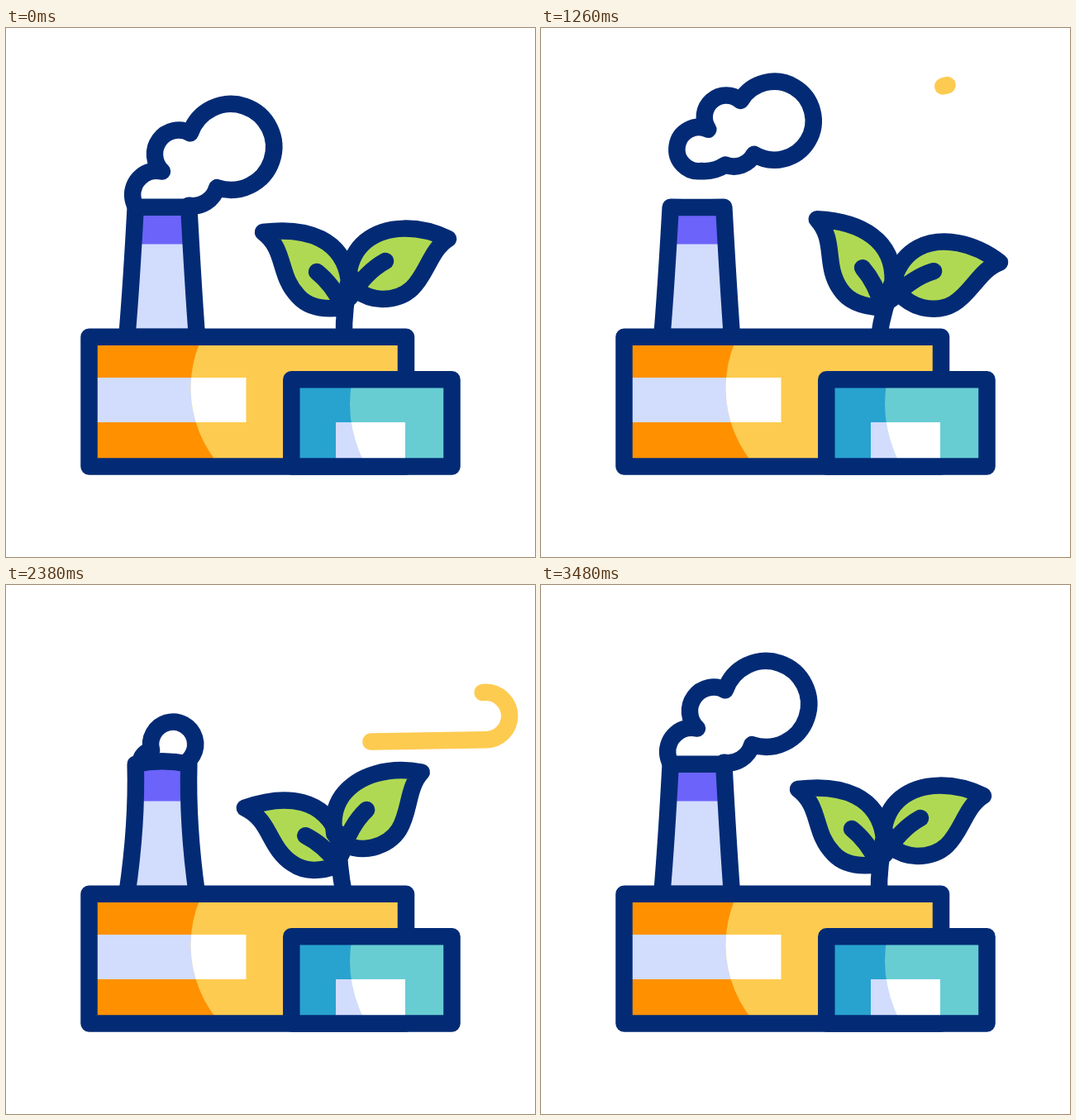
An HTML page with a canvas for the animation above (3600 ms loop, 640 by 640 pixels).

```html
<!DOCTYPE html>
<html lang="en">
<head>
<meta charset="utf-8">
<title>Green factory</title>
<style>
  html, body { margin: 0; width: 100%; height: 100%; overflow: hidden; background: #fff; }
  canvas { display: block; }
</style>
</head>
<body>
<canvas id="stage" width="640" height="640"></canvas>
<script>
const ctx = document.getElementById('stage').getContext('2d');
const LOOP = 3600;
const NAVY = '#032b75', LAVENDER = '#d2dcfd', YELLOW = '#fdcb50';
const LINE = 20.5;

const mix = (a, b, p) => a + (b - a) * p;
const rad = degrees => degrees * Math.PI / 180;
const ease = (t, from, to) => {
  const x = Math.min(1, Math.max(0, (t - from) / (to - from)));
  return x * x * (3 - 2 * x);
};

function outline(path, fill) {
  ctx.lineWidth = LINE;
  ctx.strokeStyle = NAVY;
  if (fill) {
    ctx.fillStyle = fill;
    ctx.fill(path);
  }
  ctx.stroke(path);
}

function block(color, x, y, w, h) {
  ctx.fillStyle = color;
  ctx.fillRect(x, y, w, h);
}

// Cloud with a head of radius 1 at the origin and three lobes trailing to the lower left
const cloudShape = new Path2D(`M-.45 .89 A1 1 0 1 0 -.89 -.45
  A.556 .556 0 0 0 -1.66 .34 A.56 .56 0 1 0 -1.75 1.41
  Q-1.42 1.41 -1.16 1.21 A.58 .58 0 0 0 -.45 .89 Z`);

function drawCloud({ x, y, r, tilt, size = 1 }) {
  if (size <= 0) return;
  const path = new Path2D();
  path.addPath(cloudShape, new DOMMatrix().rotate(tilt).scale(r));
  ctx.save();
  ctx.translate(x, y);
  ctx.scale(size, size);
  outline(path, '#fff');
  ctx.restore();
}

// The head swings out of the chimney, growing as the cloud untwists
function risingCloud(t) {
  const p = 1 - Math.pow(1 - Math.min(1, (t - 2380) / 1020), 1.4);
  return {
    x: mix(202, 272, p),
    y: 144 + 49 * Math.pow(1 - p, 3.4),
    r: mix(27, 52, p),
    tilt: mix(-43, -8, p)
  };
}

// The cloud pinches off, drifts up, swells and pops
function driftingCloud(t) {
  const pinch = ease(t, 160, 840), drift = ease(t, 700, 2100);
  return {
    x: 272 + 28.5 * drift,
    y: 144 - 12 * pinch - 56 * drift,
    r: 52 - 6.5 * pinch + 15.6 * drift * drift,
    tilt: -8 * (1 - pinch) + 18 * drift * (1 - drift),
    size: 1 - ease(t, 2040, 2240)
  };
}

function drawSmoke(t) {
  if (t < 2240) drawCloud(driftingCloud(t));
  if (t > 2200) drawCloud(risingCloud(t));
}

function drawChimney(t) {
  const squeeze = 7 * ease(t, 160, 700) - 17 * ease(t, 840, 1780)
    + 17 * ease(t, 1960, 2340) - 7 * ease(t, 2440, 3300);
  const lid = 217 - squeeze * (squeeze > 0 ? 1 : 0.3);
  const bend = squeeze > 0 ? 290 : 310;
  const path = new Path2D(`M146.3 374 Q${151.7 + squeeze} ${bend} 156.7 216.7
    Q189 ${lid} 221.3 216.7 Q${226.3 - squeeze} ${bend} 231 374 Z`);
  ctx.save();
  ctx.clip(path);
  block(LAVENDER, 120, 200, 140, 180);
  block('#6c63fa', 120, 200, 140, 61.5);
  ctx.restore();
  outline(path);
}

// A line with a curl at its end: the head runs along it from `begin`, the tail clears it by `end`
function drawWind(t, cx, cy, begin, end, tailTime) {
  const tailBegin = end - tailTime;
  if (t <= begin || t >= end) return;
  const run = 150, r = 28.7, turn = rad(201);
  const length = run + r * turn;
  const head = length * ease(t, begin, begin + 500), tail = length * ease(t, tailBegin, end);
  ctx.save();
  ctx.beginPath();
  ctx.moveTo(cx - run, cy + r + 2.6);
  ctx.lineTo(cx, cy + r);
  ctx.arc(cx, cy, r, Math.PI / 2, Math.PI / 2 - turn, true);
  ctx.setLineDash([Math.max(0.1, head - tail), 2 * length]);
  ctx.lineDashOffset = -tail;
  ctx.strokeStyle = YELLOW;
  ctx.lineWidth = LINE;
  ctx.stroke();
  ctx.restore();
}

const ROOT = [409, 365];
const leftShape = new Path2D('M311 247 C339 268 329 300 354 325 C367 339 388 341 408 338 L415 305 C408 256 365 240 311 247 Z');
const leftVein = new Path2D('M376 295 Q395 310 408 337');
const rightShape = new Path2D('M535 255 C504 274 509 328 455 328 C442 328 430 322 420 315 L414 300 Q417 273 435 258 C460 238 500 238 535 255 Z');
const rightVein = new Path2D('M459 282 Q435 295 416 326');

// Degrees: blown to `peak`, over to `trough` from `turn`, back upright from `release`
const sway = (t, peak, trough, turn, release) =>
  peak * ease(t, 160, 800) + (trough - peak) * ease(t, turn, 2400) - trough * ease(t, release, 3480);

function drawLeaf(shape, vein, degrees) {
  ctx.save();
  ctx.translate(...ROOT);
  ctx.rotate(rad(degrees));
  ctx.translate(-ROOT[0], -ROOT[1]);
  outline(shape, '#b0d953');
  outline(vein);
  ctx.restore();
}

function drawPlant(t) {
  const left = sway(t, 10.5, -11.9, 1200, 2480);
  const right = sway(t, 14, -14.8, 1040, 2400);
  drawLeaf(leftShape, leftVein, left);
  drawLeaf(rightShape, rightVein, right);
  const a = rad((left + right) / 2), c = Math.cos(a), s = Math.sin(a);
  const swing = (x, y) => `${ROOT[0] + x * c - y * s} ${ROOT[1] + x * s + y * c}`;
  outline(new Path2D(`M409 374 Q${swing(-1, -25)} ${swing(8, -65)}`));
}

// A house with a bright round patch; the window is shaded outside the patch
function drawHouse(x, y, w, h, dark, light, [cx, cy, r], pane) {
  const body = new Path2D(), patch = new Path2D();
  body.rect(x, y, w, h);
  patch.arc(cx, cy, r, Math.PI / 2, Math.PI * 1.5);
  patch.rect(cx, y, w, h);
  ctx.save();
  ctx.clip(body);
  block(dark, x, y, w, h);
  block(LAVENDER, ...pane);
  ctx.clip(patch);
  block(light, x, y, w, h);
  block('#fff', ...pane);
  ctx.restore();
  outline(body);
}

function drawBuildings() {
  drawHouse(100.5, 373.7, 383.5, 156.8, '#ff9100', YELLOW, [366.5, 435.5, 143], [100, 423, 190.5, 54]);
  drawHouse(345.3, 425.3, 194.2, 105.2, '#28a2cf', '#67cdd3', [569, 455, 153], [399, 477, 84, 50]);
}

function draw(t) {
  block('#fff', 0, 0, 640, 640);
  ctx.lineCap = ctx.lineJoin = 'round';
  drawSmoke(t);
  drawWind(t, 496.5, 97.3, 435, 1307, 512);
  drawWind(t, 580.5, 158.5, 1930, 2770, 445);
  drawChimney(t);
  drawPlant(t);
  drawBuildings();
}

const start = performance.now();
function tick() {
  draw((performance.now() - start) % LOOP);
  requestAnimationFrame(tick);
}
tick();
</script>
</body>
</html>
```
